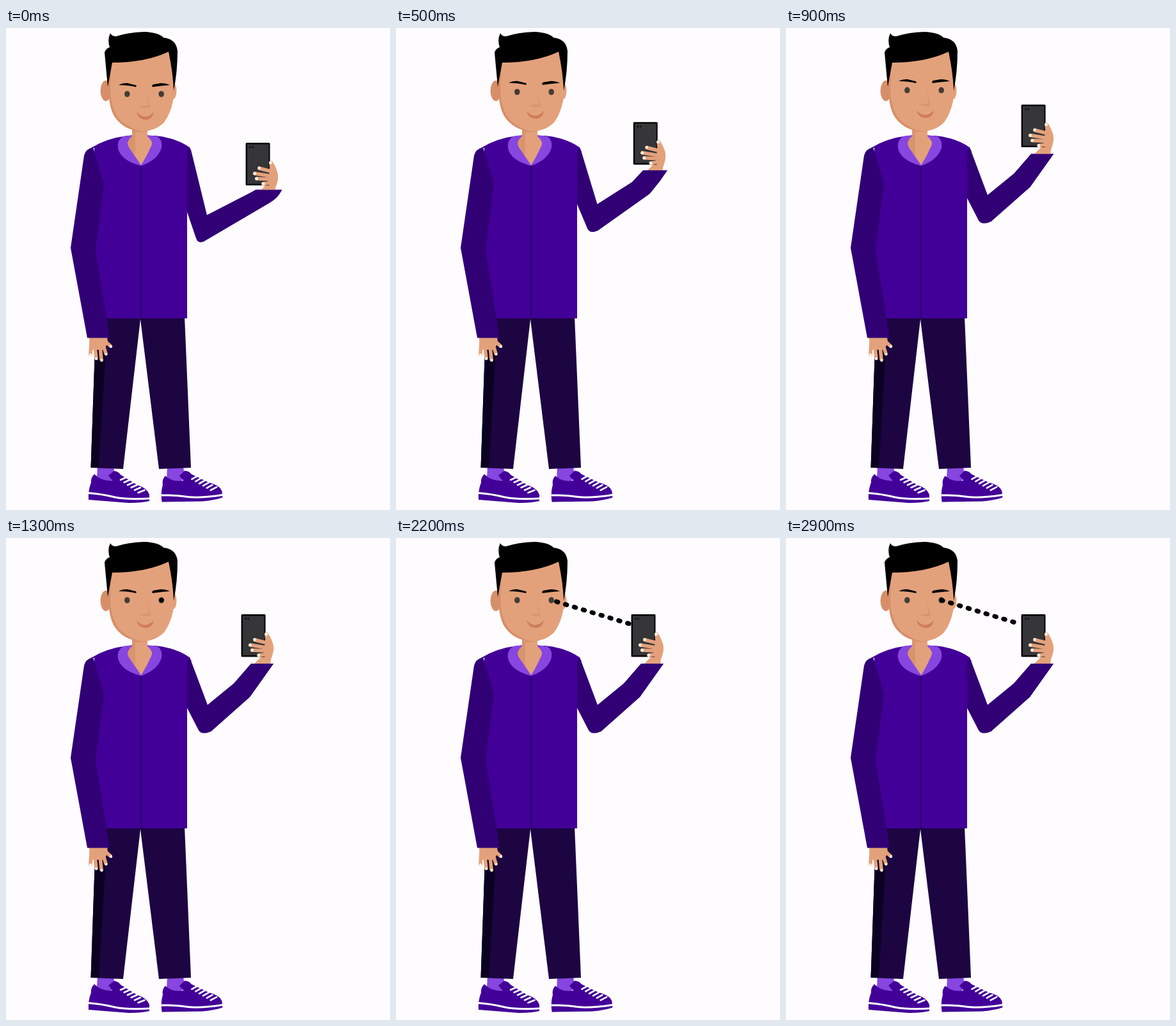
Animation, 600 px wide and 752 px high, one loop 3000 ms. Source, as an HTML page:

```html
<!DOCTYPE html>
<html lang="en">
<head>
<meta charset="utf-8">
<title>Selfie</title>
<style>
  html, body { margin: 0; width: 100%; height: 100%; overflow: hidden; background: #fefcff; }
  svg { display: block; width: 600px; height: 752px; }
  .skin { fill: #e3a17b; }
  .shade { fill: #d68f69; }
  .body { fill: #430098; }
  .sleeve { fill: #310075; }
  .trim { fill: #8746e0; }
  .pants { fill: #1c0541; }
  .finger { fill: none; stroke: #e3a17b; stroke-width: 5.6; stroke-linecap: round; }
  .nail { fill: #fdeee2; }
  .white { fill: none; stroke: #fff; }
</style>
</head>
<body>
<svg viewBox="0 0 600 752">
  <defs>
    <g id="shoe">
      <path class="body" d="M138 696L144 701Q153 707 166 706L160 698L169 691Q176 692 179 697L205 713Q221 718 224 728L224 738Q212 741 192 741L129 736Q128 722 133 709Q132 702 138 696Z"/>
      <path class="white" stroke-width="3" d="M129 725.500Q150 727 170 732Q190 736 224 734"/>
      <path class="white" stroke-width="2.600" stroke-linecap="round" d="M179 705l9-4M184.500 709l9-4M190 713l9-4M195.500 717l9-4M201 721l9-4M206.500 725l10-4"/>
    </g>
  </defs>

  <path id="arm" class="sleeve"/>

  <!-- legs and feet -->
  <path class="trim" d="M143 684H168L170 699Q165 709 155 708Q146 706 142 701Z"/>
  <path class="trim" d="M252 684H277L279 699Q274 711 264 710Q254 709 251 704Z"/>
  <use href="#shoe"/>
  <use href="#shoe" transform="translate(114.5 3.5) rotate(-5.5 129 735)"/>
  <path class="pants" d="M157 450H210.500L183 688L132.500 686L139 500Z"/>
  <path class="pants" d="M209.500 450H279L289 686L239 688Z"/>
  <path fill="#0b0222" d="M139 500H156L145 686L132.500 686Z"/>

  <!-- torso -->
  <path class="body" d="M133 187Q157 172 190 168H233Q265 171 288 187L283 192V453H138V187Z"/>
  <path stroke="#300073" stroke-width="2.400" d="M211 213V453"/>
  <path class="trim" d="M197 167L183 169Q173 175 175 188Q180 207 211 215Q237 206 243 187Q245 174 236 169L221 167Z"/>
  <path class="skin" d="M197 152V169Q191 174 190 180Q191 185 194 189Q203 202 211 214Q220 200 225 188Q228 184 228 178Q226 173 221 169V152Z"/>
  <path class="shade" d="M197 158H221V161Q212 164 202 162V201L194 189Q190 184 190 180Q191 174 197 169Z" opacity=".7"/>

  <!-- resting arm -->
  <path class="skin" d="M130 481H158L159 491Q156 499 151 502H135Q130 497 130 481Z"/>
  <path class="finger" d="M133 490L132 509M139 498L141 515M147 496L149 517M152 495L156 508M154 488L163 496"/>
  <g class="nail">
    <circle cx="132" cy="510" r="2.200"/><circle cx="141" cy="516" r="2.200"/>
    <circle cx="149.500" cy="518.500" r="2.200"/><circle cx="156.500" cy="509" r="2"/><circle cx="164" cy="497" r="2.200"/>
  </g>
  <path class="sleeve" d="M136 186Q124 189 122 199L101 343L127 483.500H162L140 347L153 243Z"/>

  <!-- head -->
  <ellipse class="shade" cx="156" cy="98" rx="8.500" ry="16"/>
  <ellipse class="skin" cx="261" cy="98" rx="5.500" ry="13"/>
  <path class="shade" d="M162 30H258L263 90Q263 125 247 147Q233 161 211 161Q185 160 170 139Q160 124 160 90Z"/>
  <path class="skin" d="M165 30H258L263 90Q263 125 247 147Q233 161 211 161Q196 158 181 146Q165 132 163 98Z"/>
  <path d="M159 92L154 38Q156 32 162 30Q158 18 163 8Q165 13 172 13Q190 7 216 6Q239 7 246 15Q266 17 268 36Q268 68 262 98Q261 70 254 37Q218 54 166 54Q163 70 159 92Z"/>
  <g id="look">
    <path d="M176 89Q182 85.500 190 86L202 89Q205 90 203 92Q191 89 176 89ZM256 89Q250 86 242 86L230 88Q227 90 229 92Q243 90 256 89Z"/>
    <ellipse cx="189.300" cy="103" rx="4.300" ry="4.800" fill="#463c35"/>
    <ellipse cx="242.700" cy="103" rx="4.300" ry="4.800" fill="#463c35"/>
  </g>
  <g id="smile">
    <path fill="#d8966f" d="M219 97L226 124Q218 126 209 123Q213 120 223 121Z"/>
    <path fill="#cd7d57" d="M204 131Q217 146 231 131Q229 143 218 143Q206 142 204 131Z"/>
  </g>

  <!-- phone and raised hand -->
  <g id="phone">
    <path class="skin" d="M411 210L424 226Q426 236 421 249L420 258H393L408 243Z"/>
    <rect x="374.500" y="179" width="38" height="66.500" rx="1.500" fill="#050505"/>
    <rect x="377" y="181.500" width="33.500" height="61.500" fill="#363537"/>
    <path stroke="#111" stroke-width="2.600" d="M380 186h3M384.500 186h2.500"/>
    <path class="skin" d="M411 209Q414 206 418 211Q426 225 425 234Q424 243 420 250L412 250L410 238L412 218Z"/>
    <path class="finger" d="M416 219L414 210M416 224L396 219M414 231L389 227M414 236L392 235M416 241L402 243"/>
    <g class="nail">
      <circle cx="413.500" cy="210" r="2.500"/><circle cx="395.500" cy="218.500" r="2.400"/>
      <circle cx="388.500" cy="227" r="2.500"/><circle cx="391.500" cy="235" r="2.500"/><circle cx="402" cy="243" r="2.500"/>
    </g>
  </g>
  <path id="cuff" class="sleeve"/>
  <line id="gaze" x1="243" y1="97" stroke="#050505" stroke-width="7.200" stroke-linecap="round" stroke-dasharray="2.4 12.1"/>
</svg>
<script>
const LOOP = 3000, RAISE = 955, GAZE_IN = 1300, GAZE_FULL = 1780;
const PITCH = 14.5, DASH = 2.4;
const $ = id => document.getElementById(id);
const [arm, cuff, look, smile, phone, gaze] = ['arm', 'cuff', 'look', 'smile', 'phone', 'gaze'].map($);

// sleeve outline: command, lowered points, raised points
const sleeve = [
  ['M', [270, 186], [270, 186]],
  ['L', [283, 185], [283, 185]],
  ['Q', [289, 187, 290, 194], [289, 187, 290, 194]],
  ['L', [314, 292], [315, 260.5]],
  ['L', [384, 256], [356, 227]],
  ['L', [390, 252.5], [383, 196]],
  ['L', [431, 252.5], [418, 196]],
  ['Q', [425, 265, 413, 272], [399.5, 222, 381, 248]],
  ['L', [309, 333], [320, 302]],
  ['Q', [300, 337, 297, 328], [306, 308, 301, 300]],
  ['L', [270, 249], [270, 240]]
];
const outline = (steps, p) =>
  steps.map(([c, a, b]) => c + a.map((v, i) => v + (b[i] - v) * p).join(' ')).join('') + 'Z';
const forearm = [['M', ...sleeve[3].slice(1)], ...sleeve.slice(4, 9)];

const clamp = v => Math.max(0, Math.min(1, v));
const ease = v => (1 - Math.cos(Math.PI * clamp(v))) / 2;
const shift = (el, x, y) => el.setAttribute('transform', `translate(${x} ${y})`);

function draw(t) {
  const p = ease(t / RAISE);
  arm.setAttribute('d', outline(sleeve, p));
  cuff.setAttribute('d', outline(forearm, p));
  shift(phone, -7 * p, -60 * p);
  shift(look, 0, -6 * p);
  shift(smile, 0, -2.8 * p);

  const g = clamp((t - GAZE_IN) / (GAZE_FULL - GAZE_IN));
  gaze.style.display = g > 0 ? '' : 'none';
  gaze.setAttribute('x2', 243 + 122 * g);
  gaze.setAttribute('y2', 97 + 37 * g);
  const first = 5.6 + (t - 1800) * 0.0089;
  gaze.setAttribute('stroke-dashoffset', DASH / 2 - first - PITCH);
}

const start = performance.now();
function tick() {
  draw((performance.now() - start) % LOOP);
  requestAnimationFrame(tick);
}
tick();
</script>
</body>
</html>
```
